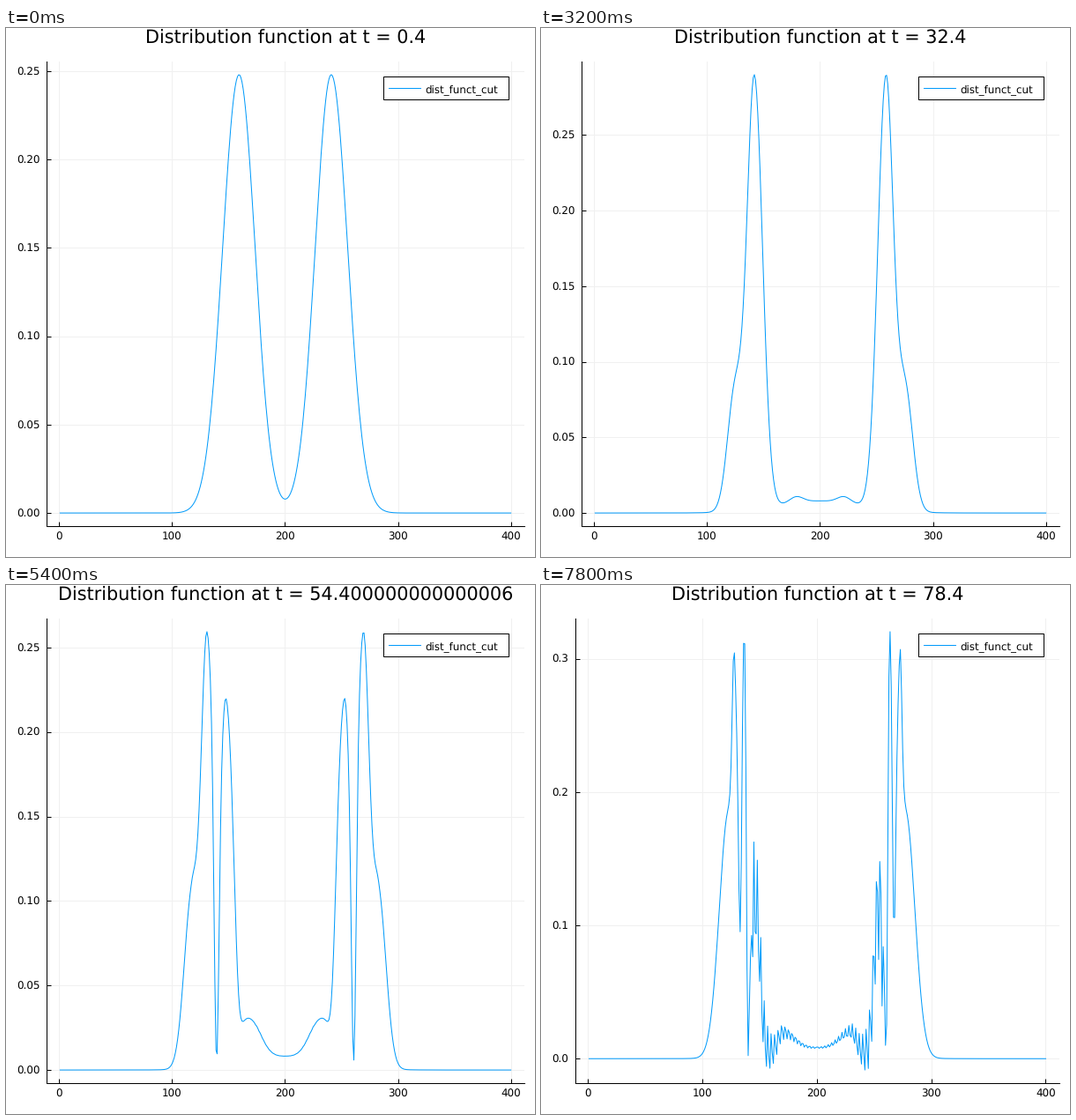
Animation, 600 px wide and 600 px high, one loop 8000 ms. Source, as a matplotlib script:

```python
import matplotlib.pyplot as plt
import numpy as np
from matplotlib.animation import FuncAnimation
from matplotlib.lines import Line2D
from matplotlib.patches import Rectangle

SIZE, DPI = 600, 100
FRAMES, INTERVAL = 40, 200
MID = 200.2              # mirror line of the velocity axis
CORE = 0.008             # density at the mirror line
BLUE = "#009AFA"
PX = 72 / DPI            # one pixel in points
SMALL, LARGE = 8.57, 14.93

plt.rcParams["font.family"] = "DejaVu Sans"
plt.rcParams["text.hinting"] = "none"

# Bells: frame, centre, height, outer width, inner width
BEAM = [(0, 159.4, .248, 14.5, 14.17), (4, 151.6, .266, 15.3, 16.7),
        (10, 151, .2977, 12, 13), (16, 142, .284, 6.5, 7.2),
        (23, 130, .232, 4.5, 5.5), (31, 132, .274, 6.1, 7), (39, 128, .2, 1.8, 4)]
SHOULDER = [(10, 125, 0, 7, 7), (16, 125, .08, 6.8, 6.8), (23, 121, .15, 6.9, 4.5),
            (31, 114, .052, 6.5, 6), (39, 123, .185, 8.2, 4.5)]
ARM = [(10, 188, 0, 8, 8), (16, 179, .004, 6, 6), (23, 148, .128, 6, 9.5),
       (31, 148, .29, 4.5, 4.5), (39, 137, .307, 3, 2.5)]
SECOND_ARM = [(23, 175, 0, 9, 9), (31, 164, .046, 9, 9.5), (39, 146.5, .115, 4, 3.8)]
THIRD_ARM = [(31, 182, 0, 6, 10), (39, 170, .014, 4, 10)]
BELLS = [BEAM, SHOULDER, ARM, SECOND_ARM, THIRD_ARM]

# Gaps between the arms: frame, centre, depth, width
GAPS = [[(16, 160, 0, 4), (23, 138.1, 1, 3.2), (31, 141, .96, 2.2), (39, 133, .6, 1.8)],
        [(23, 165, 0, 5), (31, 156.2, 1, 4.5), (39, 140, 1, 1.8)]]

index = np.arange(1, 401)


def ease(keys, n):
    """Values at step n, eased from key to key."""
    keys = np.array(keys, float)
    k = np.clip(np.searchsorted(keys[:, 0], n, side="right") - 1, 0, len(keys) - 2)
    a = np.clip((n - keys[k, 0]) / (keys[k + 1, 0] - keys[k, 0]), 0, 1)
    a = a * a * (3 - 2 * a)
    return (1 - a) * keys[k, 1:] + a * keys[k + 1, 1:]


def ripple(x, n):
    """Fine zigzag that grows in time and spreads outwards."""
    edge = 143 + 2.5 * (FRAMES - 1 - n)
    amp = 0.06 * np.exp((n - FRAMES + 1) / 2.2 - np.maximum(x - edge, 0) / 12)
    inside = (x > edge) & (x <= MID)
    return np.where(inside, amp * np.cos(2 * np.pi * (x - 145) / 3.04), 0)


def one_side(x, n):
    y = np.zeros(len(x))
    for bell in BELLS:
        c, height, outer, inner = ease(bell, n)
        y += height * np.exp(-((x - c) / np.where(x < c, outer, inner)) ** 2 / 2)
    for gap in GAPS:
        c, depth, width = ease(gap, n)
        y *= 1 - depth * np.exp(-((x - c) / width) ** 2)
    return y + ripple(x, n)


def distribution(n):
    core = CORE * np.interp(n, [4, 10], [0, 1]) * np.exp(-((index - MID) / 38) ** 2 / 2)
    return one_side(index, n) + one_side(2 * MID - index, n) + core


def at(x, y):
    """Pixel position, from the top left, as a figure fraction."""
    return x / SIZE, 1 - y / SIZE


fig = plt.figure(figsize=(SIZE / DPI, SIZE / DPI), dpi=DPI, facecolor="white")
ax = fig.add_axes([0.1, 0.1, 0.8, 0.8])
ax.set_axisbelow(True)
ax.grid(color="#f0f0f0", lw=PX)
ax.spines[["top", "right"]].set_visible(False)
ax.spines[["left", "bottom"]].set_linewidth(PX)
ax.tick_params(direction="in", length=5 * PX, width=PX, labelsize=SMALL)
ax.tick_params(axis="x", pad=6.9 * PX)
ax.tick_params(axis="y", pad=7.7 * PX)
ax.set_xlim(1 - .03 * 399, 400 + .03 * 399)
ax.set_xticks(range(0, 401, 100))
line, = ax.plot([], [], color=BLUE, lw=PX)
title = fig.text(0.5, at(0, 18)[1], "", size=LARGE, ha="center", va="baseline")

fig.add_artist(Rectangle(at(428, 81), 142 / SIZE, 26 / SIZE, fc="white",
                         ec="black", lw=PX, transform=fig.transFigure, zorder=4))
fig.add_artist(Line2D([434 / SIZE, 470 / SIZE], [at(0, 68.4)[1]] * 2,
                      color=BLUE, lw=PX, zorder=5))
fig.text(*at(475.4, 73), "dist_funct_cut", size=SMALL, va="baseline", zorder=5)


def draw(n):
    y = distribution(n)
    pad = .03 * (y.max() - y.min())
    low, high = y.min() - pad, y.max() + pad
    coarse = high > .3
    left = 39 if coarse else 46
    ticks = np.arange(0, high, .1 if coarse else .05)
    ax.set_position([*at(left, 565), (588 - left) / SIZE, 527 / SIZE])
    ax.set_ylim(low, high)
    ax.set_yticks(ticks, [f"{v:.{1 if coarse else 2}f}" for v in ticks])
    line.set_data(index, y)
    title.set_x((left + 588) / 2 / SIZE)
    title.set_text(f"Distribution function at t = {(4 + 20 * n) * 0.1}")
    return line, title


anim = FuncAnimation(fig, draw, frames=FRAMES, interval=INTERVAL,
                     init_func=lambda: draw(0), repeat=True, repeat_delay=0, blit=False)
plt.show()
```
